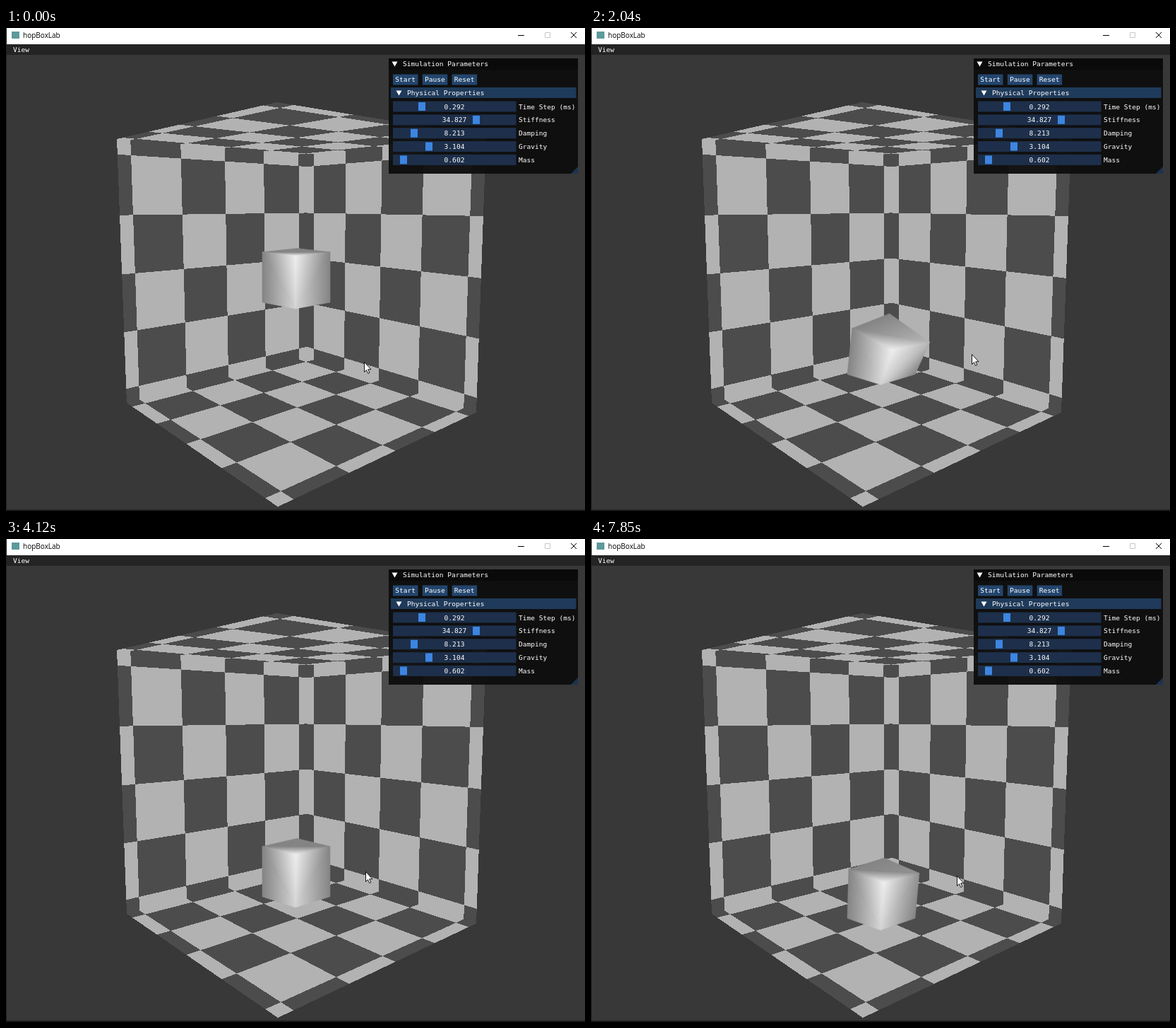
An HTML page with a canvas for the animation above (8000 ms loop, 820 px wide and 683 px high).

```html
<!DOCTYPE html>
<html lang="en">
<head>
<meta charset="utf-8">
<title>Soft cube</title>
<style>
html, body { margin: 0; width: 100%; height: 100%; overflow: hidden; background: #383838; }
svg, canvas { position: absolute; left: 0; top: 0; }
</style>
</head>
<body>
<svg id="room" width="820" height="683" shape-rendering="crispEdges"></svg>
<canvas id="stage" width="820" height="683"></canvas>
<script>
const ctx = document.getElementById('stage').getContext('2d');
const DURATION = 8000;
const MONO = '9.57px "DejaVu Sans Mono", monospace';
const SANS = '10px "Open Sans", sans-serif';

const clamp = x => Math.min(1, Math.max(0, x));
const ease = x => clamp(x) ** 2 * (3 - 2 * clamp(x));
const pulse = (t, center, width) => Math.exp(-(((t - center) / width) ** 2));

function rect(x, y, w, h, color) {
  ctx.fillStyle = color;
  ctx.fillRect(x, y, w, h);
}

function trace(points) {
  ctx.beginPath();
  points.forEach(([x, y]) => ctx.lineTo(x, y));
  ctx.closePath();
}

function poly(points, color) {
  trace(points);
  ctx.fillStyle = color;
  ctx.fill();
}

function text(str, x, y, color = '#fff', font = MONO, align = 'left') {
  ctx.font = font;
  ctx.textAlign = align;
  ctx.fillStyle = color;
  ctx.fillText(str, x, y);
}

// ---- Room ----

// Maps the unit square onto a quad in perspective.
function projector([a, b, c, d]) {
  const sx = a[0] - b[0] + c[0] - d[0], sy = a[1] - b[1] + c[1] - d[1];
  const dx1 = b[0] - c[0], dy1 = b[1] - c[1];
  const dx2 = d[0] - c[0], dy2 = d[1] - c[1];
  const det = dx1 * dy2 - dx2 * dy1;
  const g = (sx * dy2 - dx2 * sy) / det, h = (dx1 * sy - sx * dy1) / det;
  return (u, v) => [0, 1].map(i =>
    ((b[i] - a[i] + g * b[i]) * u + (d[i] - a[i] + h * d[i]) * v + a[i]) / (g * u + h * v + 1));
}

// Every face is 4.5 tiles wide, with a quarter tile at each rim.
const gridLine = n => clamp((n - 0.75) / 4.5);

function checkerFace(corners, lightParity) {
  const at = projector(corners);
  const tile = (points, color) => `<polygon points="${points.join(' ')}" fill="${color}"/>`;
  let markup = tile(corners, '#4c4c4c');
  for (let i = 0; i < 6; i++) {
    for (let j = 0; j < 6; j++) {
      if ((i + j) % 2 !== lightParity) continue;
      const [u0, u1, v0, v1] = [i, i + 1, j, j + 1].map(gridLine);
      markup += tile([at(u0, v0), at(u1, v0), at(u1, v1), at(u0, v1)], '#b2b2b2');
    }
  }
  return markup;
}

function buildRoom() {
  const topLeft = [157, 157], topBack = [426, 179.5], topRight = [680, 153], topFront = [383.5, 105];
  const lowLeft = [171, 530], lowBack = [426, 466], lowRight = [666, 543.5], lowFront = [385, 677];
  document.getElementById('room').innerHTML =
    checkerFace([topBack, topLeft, topFront, topRight], 1) +
    checkerFace([topLeft, topBack, lowBack, lowLeft], 0) +
    checkerFace([topBack, topRight, lowRight, lowBack], 1) +
    checkerFace([lowBack, lowLeft, lowFront, lowRight], 0);
}

// ---- Cube ----

const GRAVITY = 9.2e-5, DROP_START = 300, DROP_HEIGHT = 158;
const REBOUND = 0.47, CONTACT = 100;

// Parabolic hops, each a fixed fraction of the last, with a short rest on the floor.
function heightAt(t) {
  if (t < DROP_START) return DROP_HEIGHT;
  let height = DROP_HEIGHT, apex = DROP_START;
  let half = Math.sqrt(height / GRAVITY);
  while (t > apex + half + CONTACT && height > 1) {
    apex += half + CONTACT;
    height *= REBOUND;
    half = Math.sqrt(height / GRAVITY);
    apex += half;
  }
  return Math.max(0, height - GRAVITY * (t - apex) ** 2);
}

// A strong tug, a slow swing back, then a lasting lean.
const pullAt = t => pulse(t, 2040, 250) - 0.2 * pulse(t, 3000, 600) + 0.28 * ease((t - 4900) / 1200);

// side: -1 left, 1 right; near: -1 back, 1 front; level: 0 top, 1 bottom.
function corner(side, near, level, height, pull) {
  const ringY = 467 + 71 * level - 0.95 * height;
  const depth = (ringY - 215) * 0.052;
  const tug = level ? 0 : pull;
  return [
    411 - near + 48 * side + tug * (14 + 7 * side + 3 * near),
    ringY + depth * near - 6 * pull + tug * (6 + 10 * (1 + side + near - Math.abs(near)) + 10 * Math.max(0, near)),
    near > 0 ? 238 - 26 * level : 132 + 50 * tug * Math.max(0, side)
  ];
}

// A shade that is linear over a triangle is a linear gradient.
function shadedTriangle(a, b, c) {
  const x1 = b[0] - a[0], y1 = b[1] - a[1], s1 = b[2] - a[2];
  const x2 = c[0] - a[0], y2 = c[1] - a[1], s2 = c[2] - a[2];
  const det = x1 * y2 - x2 * y1;
  if (Math.abs(det) < 0.01) return;
  const gx = (s1 * y2 - s2 * y1) / det, gy = (x1 * s2 - x2 * s1) / det;
  const slope = gx * gx + gy * gy || 1e-9;
  const low = Math.min(a[2], b[2], c[2]), high = Math.max(a[2], b[2], c[2]);
  const point = shade => [a[0] + gx * (shade - a[2]) / slope, a[1] + gy * (shade - a[2]) / slope];
  const fill = ctx.createLinearGradient(...point(low), ...point(high));
  fill.addColorStop(0, `rgb(${low},${low},${low})`);
  fill.addColorStop(1, `rgb(${high},${high},${high})`);
  trace([a, b, c]);
  ctx.fillStyle = ctx.strokeStyle = fill;
  ctx.lineWidth = 0.6;
  ctx.lineJoin = 'round';
  ctx.fill();
  ctx.stroke();
}

function drawCube(t) {
  const height = heightAt(t), pull = pullAt(t);
  const at = (side, near, level) => corner(side, near, level, height, pull);
  const front = at(0, 1, 0), lowFront = at(0, 1, 1);
  shadedTriangle(at(0, -1, 0), at(-1, 0, 0), at(1, 0, 0));
  for (const side of [-1, 1]) {
    shadedTriangle(at(side, 0, 0), at(side, 0, 1), lowFront);
    shadedTriangle(at(side, 0, 0), front, lowFront);
  }
  shadedTriangle(at(-1, 0, 0), front, at(1, 0, 0));
}

// ---- Window and panel ----

function drawWindow() {
  rect(0, 0, 820, 23, '#fff');
  rect(8, 5, 11, 10, '#5d9a9c');
  text('hopBoxLab', 24, 14, '#000', SANS);
  rect(725, 10, 9, 1, '#000');
  ctx.lineWidth = 1;
  ctx.strokeStyle = '#c8c8c8';
  ctx.strokeRect(763.5, 6.5, 7, 7);
  ctx.strokeStyle = '#000';
  ctx.beginPath();
  ctx.moveTo(800, 6); ctx.lineTo(808, 14);
  ctx.moveTo(808, 6); ctx.lineTo(800, 14);
  ctx.stroke();
  rect(0, 23, 820, 15, '#242424');
  text('View', 10, 34);
  rect(0, 0, 1, 683, '#202020');
  rect(0, 681, 820, 2, '#1c1d20');
}

const SLIDERS = [
  ['Time Step (ms)', '0.292', 584], ['Stiffness', '34.827', 661], ['Damping', '8.213', 573],
  ['Gravity', '3.104', 594], ['Mass', '0.602', 558]
];

function arrowDown(x, y) {
  poly([[x, y], [x + 8, y], [x + 4, y + 7]], '#fff');
}

function drawPanel() {
  rect(542, 43, 268, 163, 'rgba(15,15,15,.97)');
  rect(542, 43, 268, 16, '#0a0a0a');
  arrowDown(546.5, 47.5);
  text('Simulation Parameters', 562, 54);
  ['Start', 'Pause', 'Reset'].forEach((label, i) => {
    const x = 548 + 41.8 * i;
    rect(x, 65.5, 35.5, 15, '#23456d');
    text(label, x + 3.2, 76);
  });
  rect(545, 84, 262.5, 15, '#1f3a5a');
  arrowDown(552.5, 88.5);
  text('Physical Properties', 568, 95);
  SLIDERS.forEach(([label, value, grab], i) => {
    const y = 103.5 + i * 18.85;
    rect(548, y, 174.5, 15, '#1d2f4a');
    rect(grab, y + 1.5, 10, 12, '#3d85e0');
    text(value, 635, y + 11, '#fff', MONO, 'center');
    text(label, 726, y + 11);
  });
  poly([[810, 196], [810, 206], [800, 206]], '#1b3350');
}

// ---- Pointer ----

// Resting points [time, x, y], joined by eased moves.
const STOPS = [[830, 507, 472], [1440, 564, 466], [2040, 539, 461], [3450, 570, 442],
  [4080, 509, 470], [6110, 512, 480], [7300, 518, 476]];
const ARROW = [[0, 0], [0, 14], [3, 11.2], [5.2, 16], [7.3, 15], [5.2, 10.3], [9.5, 10.3]];

function drawPointer(t) {
  let [, x, y] = STOPS[0];
  for (let i = 1; i < STOPS.length; i++) {
    const [start, x0, y0] = STOPS[i - 1], [end, x1, y1] = STOPS[i];
    const p = ease((t - start) / (end - start));
    x += (x1 - x0) * p;
    y += (y1 - y0) * p;
  }
  ctx.save();
  ctx.translate(Math.round(x) + 0.5, Math.round(y) + 0.5);
  poly(ARROW, '#fff');
  ctx.strokeStyle = '#000';
  ctx.lineWidth = 0.9;
  ctx.lineJoin = 'miter';
  ctx.stroke();
  ctx.restore();
}

function frame() {
  const t = performance.now() % DURATION;
  ctx.clearRect(0, 0, 820, 683);
  drawCube(t);
  drawWindow();
  drawPanel();
  drawPointer(t);
  requestAnimationFrame(frame);
}

buildRoom();
frame();
</script>
</body>
</html>
```
